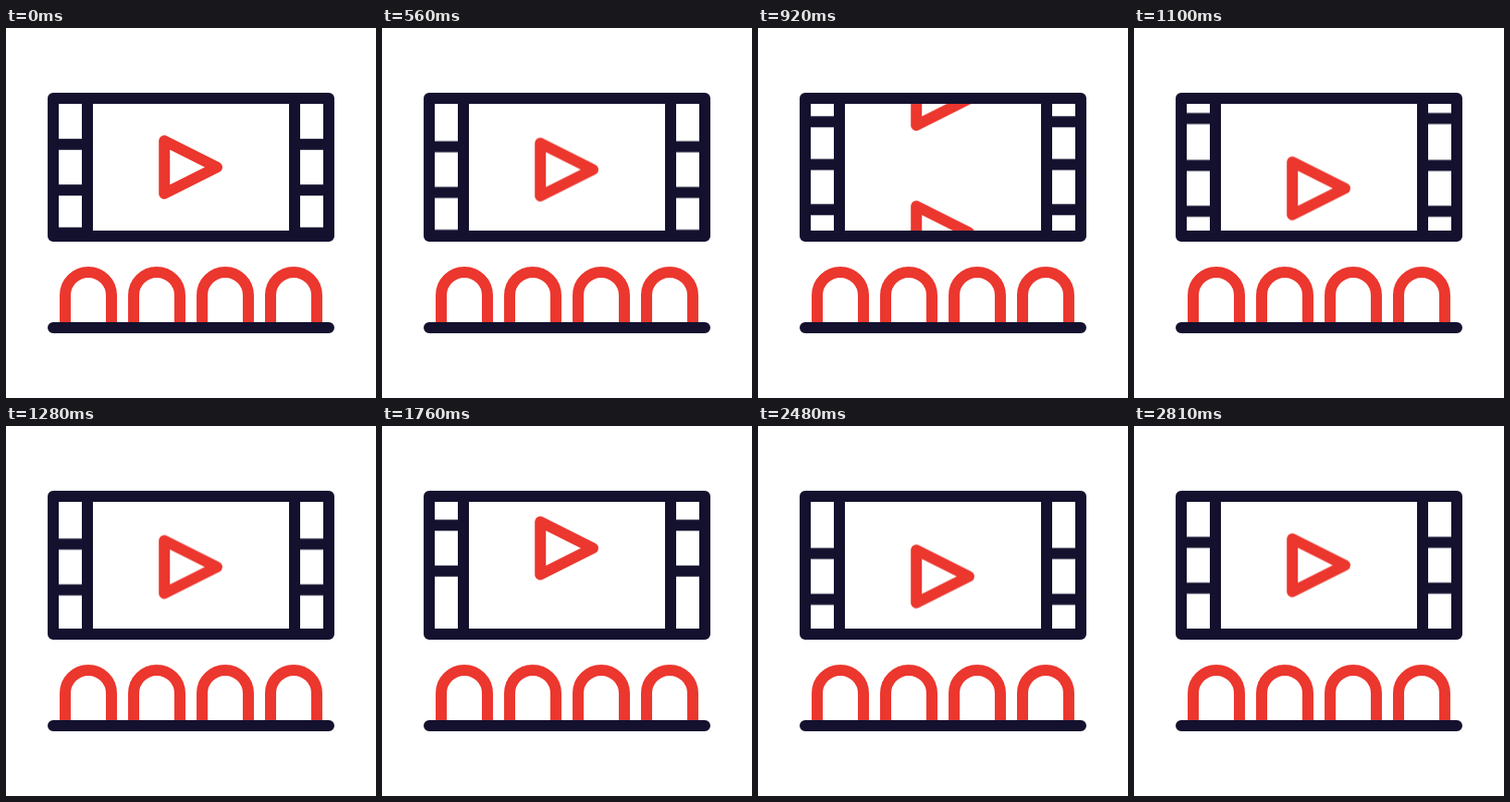
An HTML page that plays this animation: 400 px wide and 400 px high, repeating every 2840 ms.

```html
<!DOCTYPE html>
<html lang="en">
<head>
<meta charset="utf-8">
<title>Cinema</title>
<style>
  html, body { margin: 0; height: 100%; overflow: hidden; background: #fff; }
  svg { display: block; width: 100%; height: 100%; fill: none; stroke-width: 12; }
  .navy { stroke: #13112e; }
  .red { stroke: #eb372e; }
  .round { stroke-linecap: round; stroke-linejoin: round; }

  .reel { animation: scroll 2840ms infinite; }
  .divider { animation: divide 2840ms linear infinite; }

  /* wind back, roll up by one picture, overshoot, settle */
  @keyframes scroll {
    0% { transform: translateY(0); }
    18.662% { transform: translateY(0); animation-timing-function: cubic-bezier(.33, 0, .67, 1); }
    22.711% { transform: translateY(14px); animation-timing-function: cubic-bezier(.33, 0, .67, .07); }
    26.056% { transform: translateY(5.5px); animation-timing-function: cubic-bezier(.33, .19, .67, .71); }
    32.394% { transform: translateY(-73.5px); animation-timing-function: cubic-bezier(.33, .66, .67, .86); }
    45.07% { transform: translateY(-142.5px); animation-timing-function: cubic-bezier(.33, .64, .67, 1); }
    62.324% { transform: translateY(-163px); animation-timing-function: cubic-bezier(.33, 0, .67, 1); }
    82.394% { transform: translateY(-127.5px); animation-timing-function: cubic-bezier(.33, 0, .4, 1); }
    99.648%, 100% { transform: translateY(-144.5px); }
  }

  /* the bar between pictures slips behind the top edge */
  @keyframes divide {
    0%, 32.394% { transform: translateY(0); opacity: 1; }
    45.06% { transform: translateY(-4px); opacity: 1; }
    45.07%, 100% { transform: translateY(-4px); opacity: 0; }
  }
</style>
</head>
<body>
<svg viewBox="0 0 400 400">
  <defs>
    <clipPath id="screen"><rect x="51" y="76" width="298" height="149"/></clipPath>
    <path id="bars" d="M51 125.75H88M312 125.75H349M51 175.25H88M312 175.25H349"/>
    <path id="play" d="M171.2 122L228 150.5L171.2 179Z"/>
    <path id="seat" d="M64 318V289a25 25 0 0 1 50 0V318"/>
  </defs>

  <g clip-path="url(#screen)">
    <g class="reel">
      <use href="#bars" class="navy"/>
      <use href="#play" class="red round"/>
      <path class="navy divider" d="M51 221.5H88M312 221.5H349"/>
      <use href="#bars" class="navy" y="144.5"/>
      <use href="#play" class="red round" y="144.5"/>
    </g>
  </g>

  <g class="red">
    <use href="#seat"/>
    <use href="#seat" x="74"/>
    <use href="#seat" x="148"/>
    <use href="#seat" x="222"/>
  </g>

  <path class="navy round" d="M51 76H349V225H51ZM88 76V225M312 76V225M51 324H349"/>
</svg>
</body>
</html>
```
